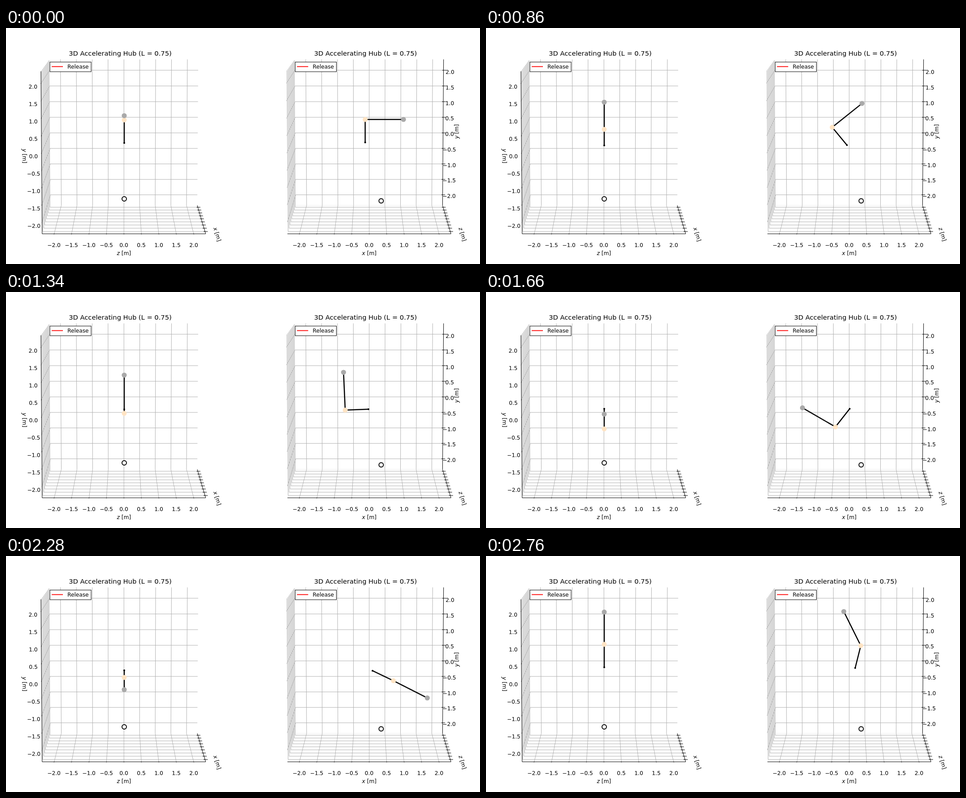
Write an HTML page that moves like this. It is 1058x529 px and loops after 2780 ms.

```html
<!DOCTYPE html>
<html lang="en">
<head>
<meta charset="utf-8">
<title>Accelerating hub</title>
<style>
html, body { margin: 0; width: 100%; height: 100%; overflow: hidden; background: #fff; }
svg { display: block; width: 100vw; height: 100vh; }
text { font: 12.2px "DejaVu Sans", sans-serif; fill: #000; text-anchor: middle; }
.title { font-size: 14.67px; }
.key { text-anchor: start; }
.grid { stroke: #b0b0b0; stroke-width: 1; fill: none; }
.axis { stroke: #000; stroke-width: 1; fill: none; }
.rod { stroke: #000; stroke-width: 2.5; fill: none; stroke-linejoin: round; }
</style>
</head>
<body>
<svg id="stage" viewBox="0 0 1058 529"></svg>
<script>
const stage = document.getElementById('stage');
const LOOP = 2780, STEP = 20;

// Perspective camera: metres in, stage pixels out
const ELEV = 7.5 * Math.PI / 180, SIN = Math.sin(ELEV), COS = Math.cos(ELEV);
const UNIT = 0.23473, FOCAL = 3160, CY = 256.6, LIM = 2.34375;
const LEFT = 263.2, RIGHT = 810.7;
const TICKS = Array.from({ length: 9 }, (_, i) => i / 2 - 2);

function project(cx, across, up, depth) {
  const [a, u, d] = [across, up, depth].map(v => v * UNIT);
  const s = FOCAL / (10 + d * COS - u * SIN);
  return [cx + s * a, CY - s * (u * COS + d * SIN)];
}

function add(tag, attrs, content) {
  const el = document.createElementNS('http://www.w3.org/2000/svg', tag);
  for (const k in attrs) el.setAttribute(k, attrs[k]);
  if (content) el.innerHTML = content;
  return stage.appendChild(el);
}

const pathOf = pts => 'M' + pts.map(p => p[0].toFixed(2) + ' ' + p[1].toFixed(2)).join('L');
const dot = (r, fill) => add('circle', { r, fill });
const label = (x, y, content, extra) => add('text', { x, y, ...extra }, content);
const axisName = n => `<tspan font-style="italic">${n}</tspan> [m]`;
const turned = (x, y, deg, name) =>
  label(0, 4.2, axisName(name), { transform: `translate(${x} ${y}) rotate(${deg})` });
const number = v => (v < 0 ? '\u2212' : '') + Math.abs(v).toFixed(1);

function drawPanel(cx, horizontal, depthName, upOnRight) {
  const at = (a, u, d) => project(cx, a, u, d);
  const line = (cls, ...pts) => add('path', { class: cls, d: pathOf(pts) });
  const off = cx - LEFT;

  if (upOnRight) {
    add('path', { d: pathOf([at(-LIM, -LIM, LIM), at(LIM, -LIM, LIM)]), stroke: '#eee', fill: 'none' });
  }
  for (const v of TICKS) {
    line('grid', at(v, -LIM, -LIM), at(v, -LIM, LIM), at(v, LIM, LIM));
    line('grid', at(-LIM, v, -LIM), at(-LIM, v, LIM), at(LIM, v, LIM));
    line('grid', at(-LIM, LIM, v), at(-LIM, -LIM, v), at(LIM, -LIM, v));
  }

  line('axis', at(-LIM, -LIM, -LIM), at(LIM, -LIM, -LIM), at(LIM, -LIM, LIM));
  if (upOnRight) line('axis', at(LIM, -LIM, LIM), at(LIM, LIM, LIM));
  else line('axis', at(-LIM, -LIM, -LIM), at(-LIM, LIM, -LIM));

  TICKS.forEach((v, i) => {
    line('axis', at(v, -LIM, -LIM - 0.08), at(v, -LIM, -LIM + 0.04));
    line('axis', at(LIM - 0.04, -LIM, v), at(LIM + 0.08, -LIM, v));
    label(cx - 0.2 + v * 78, 491, number(v));
    if (upOnRight) {
      line('axis', at(LIM - 0.04, v, LIM), at(LIM + 0.08, v, LIM));
      label(990 + v / 2, 242.1 - v * 69.4, number(v));
    } else {
      line('axis', at(-LIM, v, -LIM - 0.08), at(-LIM, v, -LIM + 0.04));
      label(61.3 - v / 2, 291.6 - v * 78, number(v));
    }
  });

  label(cx + 0.1, 508.7, axisName(horizontal));
  turned(471.5 + off, 462.5, 73, depthName);
  if (upOnRight) turned(1006, 232, -90, 'y');
  else turned(41, 287, 90, 'y');
  label(255 + off, 61.6, '3D Accelerating Hub (L = 0.75)', { class: 'title' });
}

function drawLegend(off) {
  add('rect', { x: 98 + off, y: 76.3, width: 92, height: 21.7, fill: '#fff', stroke: '#000' });
  add('path', { d: `M${102 + off} 86.5h25`, stroke: '#f00', 'stroke-width': 1.8 });
  label(137 + off, 91, 'Release', { class: 'key' });
}

// Each panel maps a point in the swing plane to the stage
function makePanel(cx, view, ...names) {
  drawPanel(cx, ...names);
  const [bx, by] = view(0.355, -1.79);
  add('circle', { cx: bx, cy: by, r: 5, fill: '#fff', stroke: '#000', 'stroke-width': 1.9 });
  const rod = add('path', { class: 'rod' });
  const marks = [dot(2, '#000'), dot(5.5, '#ffe4c4'), dot(5.6, '#a9a9a9')];
  drawLegend(cx - LEFT);
  return pts => {
    const p = pts.map(q => view(...q));
    rod.setAttribute('d', pathOf(p));
    marks.forEach((m, i) => {
      m.setAttribute('cx', p[i][0]);
      m.setAttribute('cy', p[i][1]);
    });
  };
}

const panels = [
  makePanel(LEFT, (x, y) => project(LEFT + 0.7, 0, y, x), 'z', 'x', false),
  makePanel(RIGHT, (x, y) => project(RIGHT + 0.5, x, y, 0), 'x', 'z', true)
];

// Cubic Hermite through [time, value, slope] keys
function curve(keys, t) {
  let i = 0;
  while (i < keys.length - 2 && t > keys[i + 1][0]) i++;
  const [t0, v0, m0] = keys[i], [t1, v1, m1] = keys[i + 1];
  const h = t1 - t0, u = (t - t0) / h, w = 1 - u;
  return w * w * ((1 + 2 * u) * v0 + u * h * m0) + u * u * ((3 - 2 * u) * v1 - w * h * m1);
}

// Degrees: arm direction, and wrist bend relative to the arm
const ARM = [[0, 90, 0], [0.52, 104.3, 55], [0.86, 129.2, 91], [1.34, 182.2, 138],
  [1.62, 226, 156], [1.96, 278.9, 162], [2.28, 334.2, 190], [2.76, 436.1, 218]];
const WRIST = [[0, -90, 0], [1.34, -89.8, 2], [1.62, -85, 50], [1.96, -48.6, 145],
  [2.28, -1.5, 140], [2.76, 40.2, 35]];
const ARM_LEN = 0.7, CLUB_LEN = 1.15;

const reach = ([x, y], len, deg) => {
  const a = deg * Math.PI / 180;
  return [x + len * Math.cos(a), y + len * Math.sin(a)];
};

function draw(ms) {
  const t = Math.floor((ms % LOOP) / STEP) * STEP / 1000;
  const hub = [-0.128 + 0.04 * t + 0.025 * t * t, -0.148 * t + 0.0635 * t * t];
  const arm = curve(ARM, t);
  const wrist = reach(hub, ARM_LEN, arm);
  const head = reach(wrist, CLUB_LEN, arm + curve(WRIST, t));
  panels.forEach(show => show([hub, wrist, head]));
}

const start = performance.now();
function tick() {
  draw(performance.now() - start);
  requestAnimationFrame(tick);
}
tick();
</script>
</body>
</html>
```
